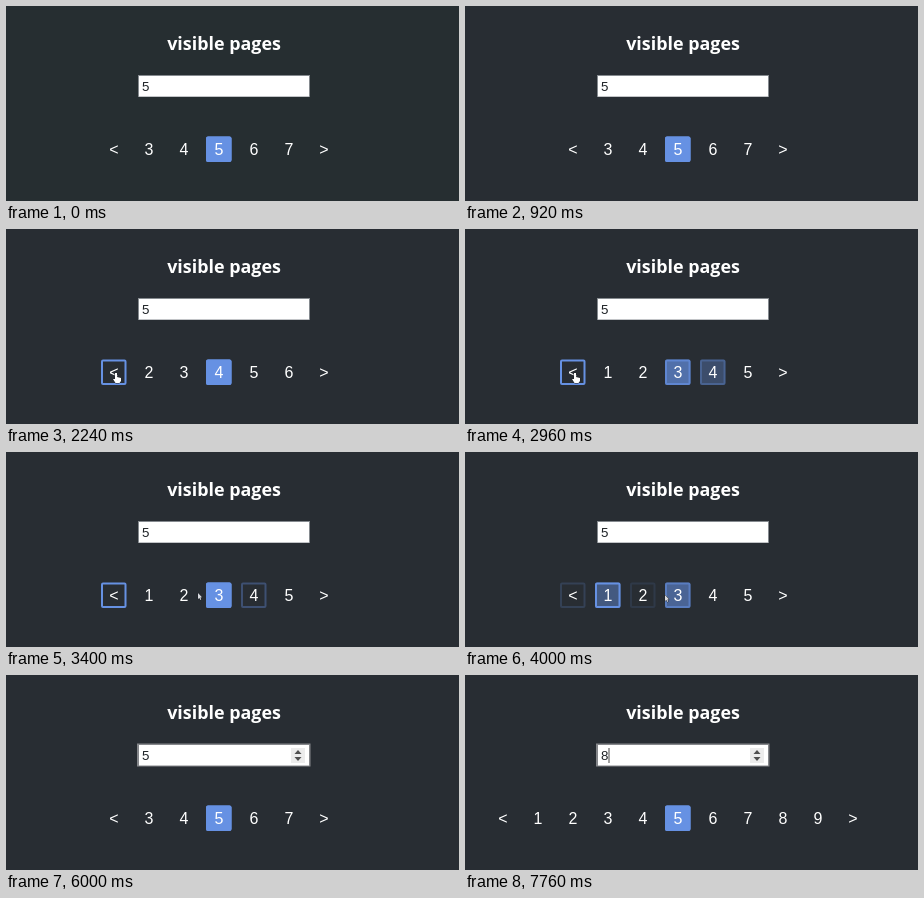
An HTML page with a canvas for the animation above (8000 ms loop, 453x195 px).

```html
<!DOCTYPE html>
<html lang="en">
<head>
<meta charset="utf-8">
<title>visible pages</title>
<style>
  html, body { margin: 0; height: 100%; overflow: hidden; background: #282d33; }
  canvas { display: block; }
</style>
</head>
<body>
<canvas id="stage" width="453" height="195"></canvas>
<script>
const ctx = document.getElementById('stage').getContext('2d');
const LOOP = 8000, FADE = 250, SAMPLES = 25, PRESS = 90;
const PITCH = 35, MID = 213, ROW = 143.5, HALF = 12.5;
const BLUE = '#6691e3', FONT = '"Liberation Sans", Arial, sans-serif';

// User actions: what is clicked when, and when the field counts up by one
const clicks = [[1320, 'input'], [1990, '<'], [2800, '<'], [3900, 1], [4730, 5], [5500, 'input']];
const keyTimes = [6320, 6680, 7680];

// Pointer moves: start, end, x, y
const moves = [
  [1120, 1320, 214, 84], [1450, 1760, 110, 144], [3000, 3210, 248, 143],
  [3210, 3400, 192, 141], [3400, 3620, 143, 143], [3910, 4000, 200, 143],
  [4000, 4500, 283, 144], [4640, 4840, 262, 144], [4840, 5320, 214, 84]
];

const clamp = v => Math.min(1, Math.max(0, v));
const mix = (a, b, k) => a + (b - a) * k;
const smooth = k => k * k * (3 - 2 * k);

function pointerAt(t) {
  if (t < moves[0][0] || t > moves[moves.length - 1][1]) return null;
  return moves.reduce((p, [start, end, x, y]) => {
    const k = smooth(clamp((t - start) / (end - start)));
    return { x: mix(p.x, x, k), y: mix(p.y, y, k) };
  }, { x: 230, y: 112 });
}

// Everything the page knows at time t
function stateAt(t) {
  let current = 5, focus = null;
  for (const [time, label] of clicks) {
    if (t >= time - PRESS) focus = label;
    if (t >= time && label !== 'input') current = label === '<' ? current - 1 : label;
  }
  const visible = 5 + keyTimes.filter(k => k <= t).length;
  const side = Math.floor(visible / 2);
  const first = Math.max(1, current - side);
  const pages = Array.from({ length: 2 * side + 1 }, (_, i) => first + i);
  const buttons = ['<', ...pages, '>'].map((label, i) => ({ label, x: MID + (i - side - 1) * PITCH }));

  const pointer = pointerAt(t);
  const over = pointer && Math.abs(pointer.y - ROW) < HALF &&
    buttons.find(b => Math.abs(pointer.x - b.x) < HALF);
  const hover = over ? over.label : null;
  const inInput = pointer && pointer.y > 69 && pointer.y < 92;
  return { current, focus, visible, buttons, pointer, hover, inInput };
}

function text(str, x, y, font, color, align = 'center') {
  ctx.font = font;
  ctx.fillStyle = color;
  ctx.textAlign = align;
  ctx.fillText(str, x, y);
}

function rect(x, y, w, h, color) {
  ctx.fillStyle = color;
  ctx.fillRect(x, y, w, h);
}

function shape(points, color, outline = 'transparent') {
  ctx.beginPath();
  points.forEach(([x, y]) => ctx.lineTo(x, y));
  ctx.closePath();
  ctx.strokeStyle = outline;
  ctx.lineWidth = 1;
  ctx.stroke();
  ctx.fillStyle = color;
  ctx.fill();
}

function box(x, inset, radius) {
  const size = 25.5 - 2 * inset;
  ctx.beginPath();
  ctx.roundRect(x - 13 + inset, ROW - 13 + inset, size, size, radius);
}

function drawButton({ label, x }, history) {
  // A linear transition is the share of the last FADE ms in which the rule held
  const share = rule => history.filter(rule).length / history.length;
  ctx.fillStyle = ctx.strokeStyle = BLUE;
  ctx.globalAlpha = share(s => s.current === label);
  box(x, 0, 2);
  ctx.fill();
  ctx.globalAlpha = share(s => [s.current, s.focus, s.hover].includes(label));
  ctx.lineWidth = 2;
  box(x, 1, 1);
  ctx.stroke();
  ctx.globalAlpha = 1;
  text(label, x, 149, `16px ${FONT}`, '#fff');
}

function drawInput(t, { focus, visible, inInput }) {
  const focused = focus === 'input';
  if (focused) rect(131, 68.5, 173.5, 23, '#85878b');
  else rect(132, 69, 172, 22, '#858a8f');
  rect(133, 70, 170, 20.5, '#fff');
  text(visible, 136, 85, `13.33px ${FONT}`, '#202428', 'left');

  const inputClicks = clicks.filter(c => c[1] === 'input').map(c => c[0]);
  const lastReset = Math.max(0, ...[...inputClicks, ...keyTimes].filter(r => r <= t));
  if (focused && (t - lastReset) % 1000 < 500) rect(143.5, 73, 1, 15, '#444');
  if (focused || inInput) {
    rect(285, 73, 14, 15, '#ececec');
    shape([[288.5, 79], [292, 75], [295.5, 79]], '#505050');
    shape([[288.5, 82], [292, 86], [295.5, 82]], '#505050');
  }
}

function drawPointer({ x, y }, hand) {
  ctx.save();
  ctx.translate(x, y);
  if (hand) {
    shape([[-1, 0], [1, 0], [1, 4], [5, 5], [5, 8], [3.5, 10], [-.5, 10], [-3, 6], [-1, 6]], '#fff', '#20242b');
  } else {
    shape([[0, 0], [0, 6], [1.4, 5], [2.4, 7], [3.2, 6.6], [2.4, 4.4], [4, 4.2]], '#d8dade', '#20242b');
  }
  ctx.restore();
}

function draw(t) {
  const settle = clamp((t - 40) / 640);
  rect(0, 0, 453, 195, `rgb(${mix(38, 40, settle)}, ${mix(46, 45, settle)}, ${mix(49, 51, settle)})`);
  text('visible pages', 218, 44, 'bold 17.9px "Open Sans", sans-serif', '#fff');

  const state = stateAt(t);
  const history = Array.from({ length: SAMPLES }, (_, i) => stateAt(t - i * FADE / SAMPLES));
  drawInput(t, state);
  state.buttons.forEach(b => drawButton(b, history));
  if (state.pointer && !state.inInput) drawPointer(state.pointer, state.hover !== null);
}

function tick() {
  draw(performance.now() % LOOP);
  requestAnimationFrame(tick);
}
tick();
</script>
</body>
</html>
```
